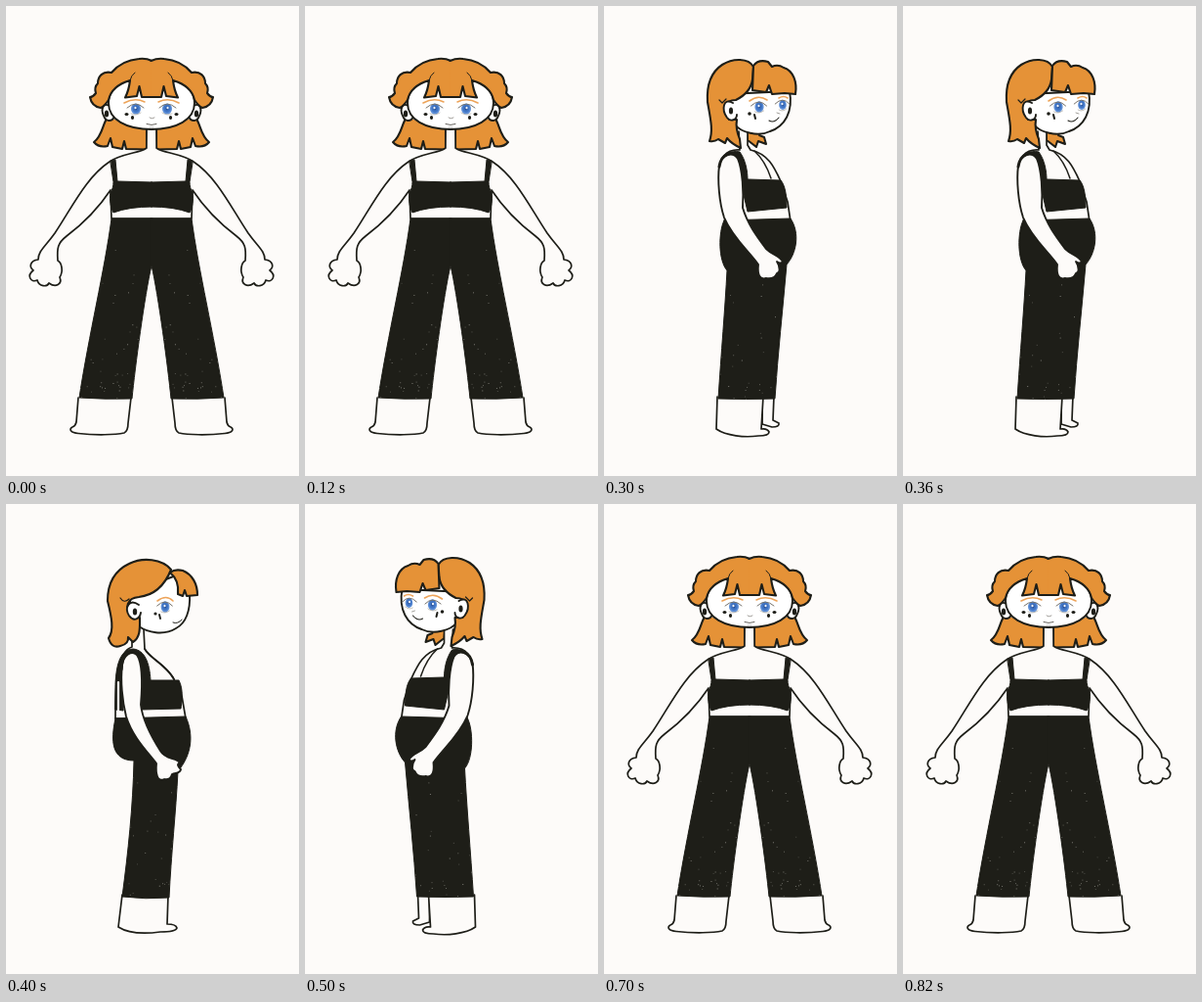
Write an HTML page with a canvas that moves like this. It is 300 by 480 pixels and loops after 0.9 s.

```html
<!DOCTYPE html>
<html lang="en">
<head>
<meta charset="utf-8">
<title>Turnaround</title>
<style>
html, body { margin: 0; width: 100%; height: 100%; overflow: hidden; background: #fdfbf9; }
canvas { display: block; width: 300px; height: 480px; }
</style>
</head>
<body>
<canvas id="stage" width="300" height="480"></canvas>
<script>
const ctx = document.getElementById('stage').getContext('2d');
const INK = '#1e1e18', HAIR = '#e59237', BLUE = '#3f74c4', PAPER = '#fdfbf9';
const LOOP = 900;

function shape(d, fill, width = 1.7) {
  const path = new Path2D(d);
  ctx.fillStyle = fill;
  ctx.fill(path);
  ctx.lineWidth = width;
  ctx.strokeStyle = INK;
  ctx.stroke(path);
}
const skin = (d, w) => shape(d, PAPER, w);
const face = d => shape(d, '#fff', 1.9);
const hair = d => shape(d, HAIR, 2.1);
const cloth = d => shape(d, INK, 1);
const line = (d, w = 1.5, color = INK) => {
  ctx.lineWidth = w;
  ctx.strokeStyle = color;
  ctx.stroke(new Path2D(d));
};

function flip(sum, draw) {
  ctx.save();
  ctx.translate(sum, 0);
  ctx.scale(-1, 1);
  draw();
  ctx.restore();
}
function both(draw) {
  draw();
  flip(298, draw);
}

function oval(x, y, rx, ry, fill) {
  ctx.fillStyle = fill;
  ctx.beginPath();
  ctx.ellipse(x, y, rx, ry, 0, 0, Math.PI * 2);
  ctx.fill();
}
function eye(x, y, rx = 5, ry = 5.5) {
  oval(x, y, rx, ry, '#5f8fd6');
  oval(x, y - 0.5, rx * 0.7, ry * 0.75, BLUE);
  oval(x, y - 0.5, rx * 0.3, ry * 0.35, '#274f96');
  oval(x - 0.5, y - 1, 1.1, 1.2, '#eef5ff');
  line(`M${x - rx - 4} ${y - 1} Q${x} ${y - 9} ${x + rx + 3} ${y - 1}`, 1, '#77736c');
  line(`M${x - rx} ${y + 5} Q${x} ${y + 7.5} ${x + rx} ${y + 4}`, 0.7, '#aaa69f');
}
const brow = d => line(d, 1.6, '#eda45a');

// Worn-print flecks, denser toward the hems.
function flecks(d, seed, count) {
  ctx.save();
  ctx.clip(new Path2D(d));
  ctx.fillStyle = '#b9b8b0';
  const rnd = () => (seed = (seed * 16807) % 2147483647) / 2147483647;
  for (let i = 0; i < count; i++) {
    const x = 75 + rnd() * 150, y = 400 - rnd() * rnd() * 180;
    ctx.globalAlpha = 0.3 + rnd() * 0.5;
    ctx.fillRect(x, y, 0.9, 0.9);
  }
  ctx.restore();
}
function trousers(d, seed, count) {
  cloth(d);
  flecks(d, seed, count);
}

function front() {
  both(() => hair('M104 114 C99 119 99 133 90 139 Q95 145 104 143 L107 135 L109 144 L119 146 L121 138 L123 146 L144 146.5 L144 125'));
  both(() => {
    skin('M144 127 L144 145 Q140 148 130 150 C118 153 110 156 106 159 C82 175 68 205 50 232 C40 246 33 250 33 259 C25 260 23 266 28 270 C21 275 25 283 32 280 C34 287 42 287 44 283 C51 288 58 284 55 277 C59 271 57 262 53 260 C52 247 53 242 62 235 C82 220 97 203 107 188 L108 217 L149.5 217');
    skin('M74 400 L72 425 Q71 429 68 430 C64 432 66 436 74 436.5 C92 438.5 112 438 121 436 Q125 434 125 426 L128 400');
  });
  ctx.fillStyle = PAPER;
  ctx.fillRect(144.9, 126, 8.2, 90);
  both(() => cloth('M107 158 L112 157 L114 179 L150 180 L150 205 Q126 205 110 211 C107 206 106 198 107 191 C109 187 110 184 110 180 Z'));
  const half = 'M150 217 L108 217 C101 270 85 335 75 400 Q102 402 129 401 C132 370 142 295 149 265 L150 265 Z';
  both(() => trousers(half, 71, 130));

  both(() => {
    face('M106 102 C99 98 97 106 100 112 C102 118 108 119 111 113');
    oval(103, 110, 2.2, 3.6, INK);
  });
  both(() => face('M149.5 75 L127 72 C108 80 105 92 105 99 C105 116 123 126 149.5 126'));
  both(() => {
    hair('M149.5 56 Q143 53 136 54 C124 55 114 61 108 68 C99 66 94 72 94 79 C91 82 91 86 92 89 Q89 93 86 93 C87 99 91 103 97 104 C101 102 103 99 105 96 C107 87 113 80 127 76 C126 84 125 88 122 93.5 L134 92 L136.5 82 L139 93 L149.5 93');
    line('M127 76 Q128 71 132 68', 1);
    eye(133, 105);
    brow('M121 99 Q132 93 142 98');
    oval(123.5, 110.5, 2, 1.6, INK);
    oval(129.5, 114, 1.6, 2, INK);
  });
  line('M147 114 Q149 116 152 114', 0.8, '#8b8882');
  line('M144 120.5 Q149 122.5 154 120.5', 0.9, '#55524c');
  line('M147 124 L151 124', 0.7, '#999');
}

function quarter() {
  hair('M108 114 C107 126 107 132 101 138 Q107 140 112 137 L114 131 L118 138 L123 138 L124 134 L128 138 L143 138 L143 124');
  hair('M152 126 L152 140 L164 138 L178 135 L181 140 L187 132 L189 138 Q195 140 200 137 Q194 131 192 116 L180 122');
  skin('M191 238 C196 248 203 260 204 267 Q205 277 200 279 L195 275');
  skin('M143 124 L143 140 C128 142 114 143 108 149 L112 220 L186 220 L186 150 C182 143 164 141 152 140 L152 124');
  skin('M98 399 L100 431 C110 438 124 439 136 436 Q147 436 148 432 Q147 429 139 430 L140 399');
  skin('M166 399 L172 434 C182 439 198 437 210 435 Q221 433 221 429 L213 429 L210 399');
  cloth('M109 148 C115 141 126 141 134 144 C130 158 132 177 141 177 Q155 179 170 177 C175 170 173 154 169 142 L179 145 C184 152 182 166 184 179 C188 188 187 200 184 208 Q149 202 113 210 C117 192 124 168 123 152 Q116 145 109 148 Z');
  trousers('M112 218 L186 217 C190 244 198 275 203 315 Q207 360 210 401 Q186 404 166 402 C163 360 155 300 150 268 C144 310 143 360 140 402 Q117 402 98 401 C94 350 92 290 97 230 Z', 319, 110);
  skin('M110 147 C102 153 99 164 96 178 L87 211 C90 225 98 237 105 249 Q108 257 106 264 C102 270 106 279 112 276 C115 280 120 279 122 276 C128 280 134 275 131 267 Q136 271 137 264 C134 258 126 254 123 249 C116 240 111 232 109 223 C109 207 119 188 123 170 Q126 152 122 147 Q116 143 110 147 Z', 1.9);
  line('M109 148 Q116 141 126 144', 3);

  face('M111 98 C104 98 105 110 110 114 C115 119 119 116 119 112 C124 123 139 126 153 126 C174 127 187 119 190 105 L190 87 L122 77 Z');
  oval(115, 108, 2.2, 3.7, INK);
  hair('M140 56 C153 53 178 54 187 69 Q194 79 192 94 L187 91 L185 82 L182 89 L172 89 L169 81 L167 90 L154 91 L141 89 L139 81 L136 90 L130 88 L131 78 C121 82 116 88 113 97 C108 97 108 102 104 104 Q96 102 98 96 L103 94 C96 88 99 80 107 80 C109 66 123 55 140 56 Z');
  line('M131 78 Q131 73 134 69', 1);
  eye(145, 104);
  eye(171, 104, 4.7, 5.5);
  brow('M134 98 Q143 93 151 98');
  brow('M164 98 Q172 93 179 98');
  oval(136, 109, 1.7, 1.6, INK);
  line('M140 111 L141 115', 2.3);
  line('M180 104 L182 108', 2.2);
  line('M176 111 L178 114', 1.8);
  line('M157 114 L160 115', 0.8, '#8b8882');
  line('M154 121 Q158 123 162 120', 1);
}

function side() {
  hair('M146 127 L147 137 Q151 140 156 144 L158 138 L166 141 L164 134 L159 132');
  skin('M162 398 L162 427 L172 430 Q180 430 179 426 L173 423 L174 398');
  skin('M116 399 L115 432 C125 439 144 441 158 439 Q169 439 169 435 Q167 431 161 432 L163 399');
  skin('M138 128 L139 147 C124 146 118 157 118 168 L124 220 L191 220 L188 200 L181 179 C174 164 168 151 150 147 L147 142 L147 127');
  cloth('M119 163 C120 151 130 147 139 149 C145 157 147 169 147 177 L181 178 C186 184 187 195 187 206 L147 210 L140 180 Z');
  line('M154 148 Q165 158 171 176', 1.5);
  trousers('M123 219 L191 217 C201 232 197 253 187 264 C183 310 178 355 175 401 Q145 402 117 401 C120 355 124 308 126 270 C117 260 117 231 123 219 Z', 811, 60);
  skin('M118 163 C121 151 132 148 137 156 C142 168 143 190 142 206 C147 223 157 236 166 248 C172 254 180 255 183 261 Q181 264 177 261 C181 267 180 273 177 273 C174 280 168 278 166 278 C159 280 157 274 158 264 C149 251 132 237 123 216 C118 201 116 178 118 163 Z', 1.9);
  line('M118 164 C120 151 130 147 138 154', 3);

  face('M126 90 L190 87 C194 108 185 123 170 128 C158 134 140 129 134 121 L126 115 Z');
  hair('M153 62 C148 53 132 53 121 60 C109 68 105 82 106 98 C109 115 112 127 108 138 Q113 139 117 136 L124 140 L126 135 Q131 141 140 145 L139 136 C136 129 135 122 136 116 L128 116 C121 106 123 96 135 96 C145 91 151 83 152 75 Z');
  face('M132 99 C122 93 120 106 126 114 C130 119 136 116 136 111');
  oval(130, 107, 2.1, 3.6, INK);
  line('M118 96 L121 99 L125 95', 1.2);
  hair('M153 61 Q158 54 168 57 L172 62 Q178 59 184 63 C194 66 198 78 196 90 L185 89 L172 90 L169 81 L166 88 L152 86 Z');
  eye(159, 103, 4.6, 5.7);
  eye(183, 101, 3.8, 5);
  brow('M149 97 Q158 90 167 96');
  brow('M179 94 Q184 91 188 94');
  oval(149, 110, 1.8, 1.7, INK);
  line('M154 111 L155 115', 2);
  line('M177 109 L180 110', 0.8, '#8b8882');
  line('M169 117 Q174 120 179 114', 1.1);
}

function profile() {
  skin('M119 399 L115 432 C126 439 143 439 158 437 Q174 437 175 433 Q174 429 165 429 L166 399');
  skin('M129 128 L129 146 C114 151 112 178 112 219 L184 219 L180 196 L171 177 C160 161 146 157 142 148 L141 128');
  cloth('M112 184 C113 161 118 149 130 148 C142 149 147 162 148 180 L177 180 C182 190 180 202 179 209 L139 210 L136 180 L119 175 L120 211 L112 210 Z');
  line('M142 148 C150 160 164 164 172 179', 1.7);
  line('M115 182 L115 215', 2.2, PAPER);
  trousers('M112 219 L184 217 C192 235 191 255 176 273 C174 314 169 359 167 402 Q143 404 119 401 C125 356 130 309 131 262 C108 262 107 242 112 219 Z', 523, 65);
  skin('M119 165 C120 154 129 149 134 154 C140 163 140 181 138 205 C140 222 149 238 158 252 C163 261 174 259 178 264 C174 266 177 269 179 271 C178 276 173 274 170 276 C168 283 163 281 162 281 C155 284 153 276 154 265 C145 253 130 239 123 217 C119 201 117 180 119 165 Z', 1.9);
  line('M118 169 C119 151 128 148 134 153', 3);

  face('M127 91 L174 73 L188 92 C189 109 184 122 174 127 C161 135 145 131 136 125 L127 116 Z');
  hair('M169 67 C160 56 140 54 126 61 C109 69 104 83 104 99 C108 115 111 129 105 137 Q108 148 117 145 Q126 143 125 136 L130 141 C138 136 137 126 137 116 L128 116 C121 105 124 96 136 95 C153 93 163 82 169 67 Z');
  face('M136 103 C126 96 121 106 126 114 C131 121 137 117 138 111');
  oval(132, 110, 2.2, 3.6, INK);
  line('M117 96 Q121 102 126 97', 1.2);
  hair('M168 70 Q173 66 181 68 C191 72 196 82 196 93 L185 94 L183 88 L181 94 L176 92 C177 83 174 75 168 70 Z');
  eye(163, 105, 4.4, 5.7);
  brow('M155 99 Q164 92 171 99');
  oval(153, 112, 1.6, 1.5, INK);
  line('M157 113 L158 117', 1.9);
  line('M171 121 Q176 123 180 118', 1);
}

const poses = [
  [200, front],
  [300, quarter],
  [400, side],
  [500, profile],
  [600, () => flip(289.5, side)],
  [700, () => flip(295.5, quarter)],
  [LOOP, front]
];

let shown = null;
const start = performance.now();
function tick() {
  const t = (performance.now() - start) % LOOP;
  const pose = poses.find(([end]) => t < end)[1];
  if (pose !== shown) {
    shown = pose;
    ctx.lineCap = ctx.lineJoin = 'round';
    ctx.fillStyle = PAPER;
    ctx.fillRect(0, 0, 300, 480);
    pose();
  }
  requestAnimationFrame(tick);
}
tick();
</script>
</body>
</html>
```
